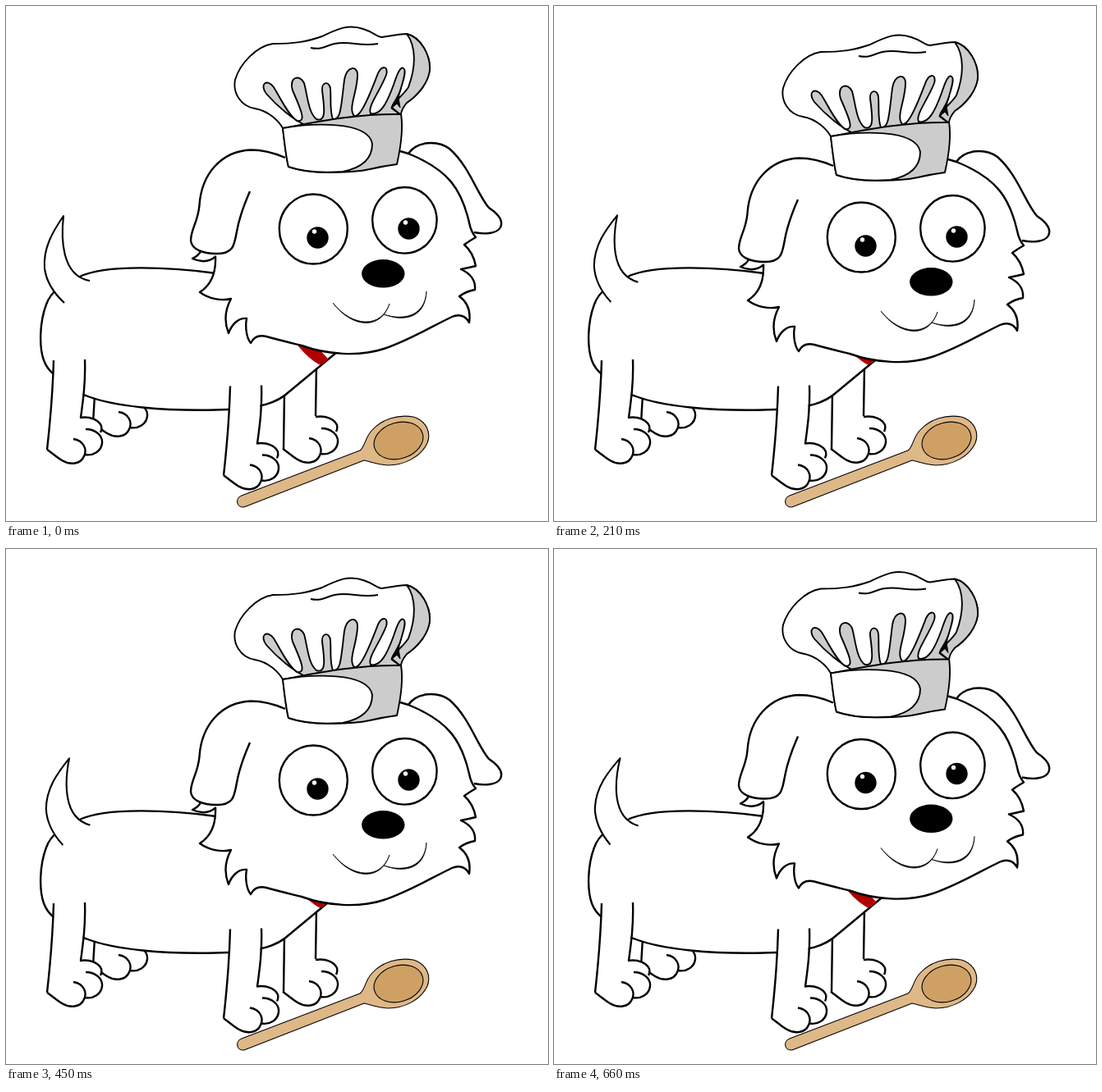
Write an HTML page that moves like this. It is 660 px wide and 628 px high and loops after 690 ms.

```html
<!DOCTYPE html>
<html lang="en">
<head>
<meta charset="utf-8">
<title>Chef dog</title>
<style>
html, body { margin: 0; width: 100%; height: 100%; overflow: hidden; background: #fff; }
svg { display: block; width: 660px; height: 628px; }
</style>
</head>
<body>
<svg viewBox="0 0 660 628" fill="#fff" stroke="#000" stroke-width="2.4" stroke-linejoin="round">
  <defs>
    <g id="paw">
      <path stroke="none" d="M50 541L53 500H91C106 500 116 506 116 518C120 532 116 547 97 547C94 558 80 562 68 553Z"/>
      <path fill="none" d="M90 502C103 500 113 505 116 512Q117 516 115 520M97 516C109 516 118 524 117 533C116 543 106 549 96 547M82 528C95 530 99 541 95 549C91 559 78 560 68 554C60 549 55 544 50 541"/>
    </g>
    <g id="leg">
      <path stroke="none" d="M58 433L50 541L91 510L96 432Z"/>
      <use href="#paw"/>
      <path fill="none" d="M58 432C57 470 54 505 50 541M96 431C97 458 94 480 91 502"/>
    </g>
  </defs>

  <use href="#paw" x="55" y="-33"/>
  <path d="M108 475L106 508"/>
  <use href="#paw" x="287" y="-1"/>
  <path d="M339 470L338 541M378 438L377 500"/>

  <path d="M256 326C200 318 120 315 90 330C70 338 55 347 49 364C41 385 40 415 46 432C49 440 52 444 58 449C70 468 85 472 97 475C130 488 190 495 272 492C310 490 330 484 344 471L403 422L420 406"/>
  <path fill="#b00000" stroke="none" d="M348 404L372 409L393 431L383 438Q365 429 348 404"/>
  <use href="#leg"/>
  <use href="#leg" x="215" y="31.500"/>
  <path id="tail" stroke-width="2.1" d="M71 362C58 350 49 335 47 320C45 295 57 275 70 256C67 282 67 329 102 335"/>

  <g id="head">
    <path d="M237 299C235 304 231 306 227 308C238 313 248 312 256 305"/>
    <path d="M490 180C500 165 525 163 540 174C564 195 574 230 588 246C600 254 606 262 602 270C598 277 585 279 570 276"/>
    <path stroke="none" d="M340 184L235 245L256 305L563 275L490 179Z"/>
    <path d="M255 305C256 325 250 340 236 349C247 357 262 360 274 357C267 370 265 384 271 399C275 388 283 380 293 381C291 392 293 405 298 411C302 403 309 401 317 403C335 408 348 411 360 414C390 425 430 428 460 418C490 408 520 390 543 379C552 375 560 378 564 386C566 373 563 362 552 354Q560 348 571 346C572 336 567 327 554 321Q564 319 572 317C570 306 566 298 558 291Q565 286 572 282Q566 275 564 264C555 225 540 200 490 180L480 177"/>
    <path d="M340 185C322 177 310 175.500 298 175.500C262 177 238 205 235.500 243C234 263 225 272 225 286C226 297 240 302 257 302C278 302 278 290 281 275C284 258 290 242 297 226"/>

    <ellipse cx="374.300" cy="272" rx="41.500" ry="42.500"/>
    <ellipse cx="485.400" cy="261.300" rx="39.200" ry="40.300"/>
    <g stroke="none">
      <g id="pupil"><circle cx="379.500" cy="282.500" r="13.200" fill="#000"/><circle cx="375.500" cy="275" r="2.700"/></g>
      <use href="#pupil" x="111" y="-11"/>
      <ellipse cx="459.300" cy="326.300" rx="26.200" ry="17.200" fill="#000"/>
    </g>
    <path fill="#000" stroke-width=".7" d="M398 362C422 394 457 395 467 363C457 393 422 392 398 362M460 376C485 386 511 380 512 348C510 378 485 384 460 376"/>

    <g stroke-width="1.900">
      <path d="M337 149C332 140 320 128 303 125C285 122 276 105 279 90C285 70 305 49 325 46C350 46 365 44 385 37C400 30 415 21 435 28C448 32 452 38 458 38C470 36 480 34 488 34C505 38 517 60 516 78C514 95 500 110 488 118C483 124 480 128 481 133L478 150Z"/>
      <path fill="#ccc" d="M488 34C505 38 517 60 516 78C514 95 500 110 488 118C483 124 481 128 481 133L470 124C474 114 483 110 490 99C499 75 500 50 488 34"/>
      <path fill="#ccc" d="M366 146C350 139 330 122 317 107C308 95 318 88 326 99C334 112 343 132 354 140C366 142 360 128 349 103C344 86 358 83 363 94C367 108 368 130 378 138C390 142 388 125 385 103C384 92 394 91 395 101C396 115 394 128 398 138C408 140 408 122 412 90C415 73 428 72 428 84C428 105 416 125 424 134C432 138 446 100 453 82C458 72 466 73 463 84C455 105 440 122 444 131C456 134 464 118 472 96C476 84 480 73 484 76C488 78 484 90 481 100C478 112 470 119 470 125L481 133Z"/>
      <path fill="#000" stroke-width="1" d="M481 100C480 111 470 117 469 125L476 119L480 124L478 112Z"/>
      <path fill="#ccc" d="M337 149C385 140 430 131 481 132C484 150 480 175 476 193Q460 195 443 199C420 204 370 205 344 196C341 185 339 165 337 149"/>
      <path d="M337 149C370 143 441 139 446 168C446 188 430 198 410 202Q370 205 344 196C341 185 339 165 337 149"/>
      <path fill="none" d="M371 51C385 54 390 48 400 46C420 42 430 50 453 46"/>
    </g>
  </g>

  <g stroke-width="1.100">
    <path fill="#deb887" d="M287 597L431 542C437 538 437 527 445 518C458 503 478 498 496 501C512 506 518 520 513 533C505 550 485 560 465 560C452 559 445 556 436 554L290 611C280 612 279 600 287 597"/>
    <ellipse cx="478" cy="530" rx="30.500" ry="22" fill="#cfa064" transform="rotate(-17 478 530)"/>
  </g>
</svg>
<script>
const STEP = 30, STEPS = 23;
// [step, value] pairs, linear in between
const headDrop = [[0, 0], [4, 10], [7, 10], [11, 0], [15, 10], [19, 10], [23, 0]];
const tailTurn = [[0, 0], [3, 15.5], [7, 4.7], [11, 15.5], [15, 4.7], [19, 15.5], [23, 4.2]];
const head = document.getElementById('head');
const tail = document.getElementById('tail');

function valueAt(keys, step) {
  const next = keys.findIndex(([at]) => at > step);
  const [[a, from], [b, to]] = [keys[next - 1], keys[next]];
  return from + (to - from) * (step - a) / (b - a);
}

function draw() {
  const step = Math.floor(performance.now() / STEP) % STEPS;
  head.setAttribute('transform', `translate(0 ${valueAt(headDrop, step)})`);
  tail.setAttribute('transform', `rotate(${valueAt(tailTurn, step)} 82 341)`);
  requestAnimationFrame(draw);
}
draw();
</script>
</body>
</html>
```
